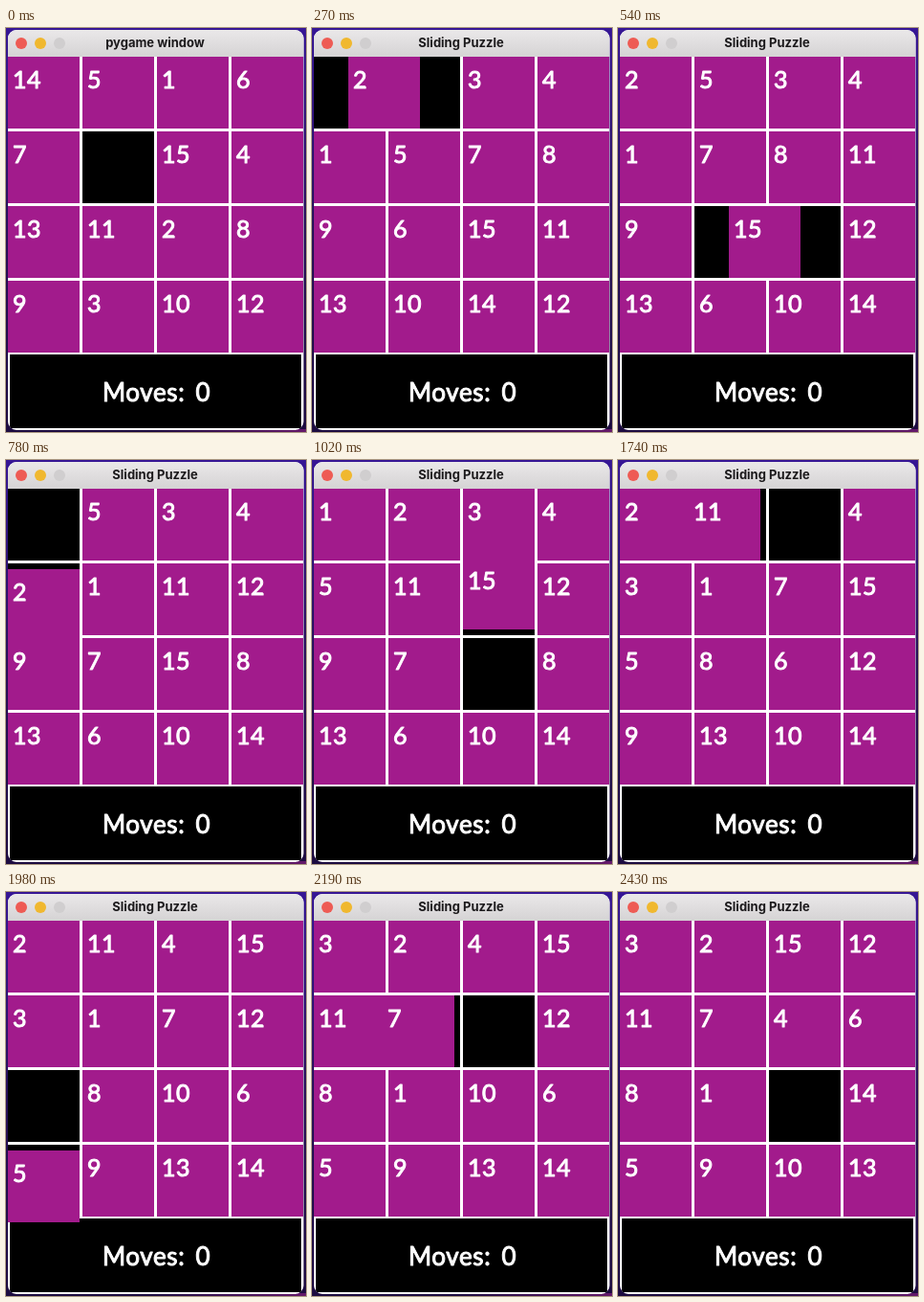
These frames come from a looping animation (314x422 px, 2730 ms). An HTML page with a canvas:

```html
<!DOCTYPE html>
<html lang="en">
<head>
<meta charset="utf-8">
<title>Sliding Puzzle</title>
<style>
  html, body { margin: 0; width: 314px; height: 422px; overflow: hidden; }
  canvas { display: block; }
</style>
</head>
<body>
<canvas id="stage" width="314" height="422"></canvas>
<script>
const ctx = document.getElementById('stage').getContext('2d');

const LOOP = 2730, STEP = 30;
const PITCH = 78, TILE = 75, LEFT = 2, TOP = 30, SLIDE = 42;
const PURPLE = '#a21b8c';

// The previous game flashes up before the solved board is shuffled.
const oldBoard = [14, 5, 1, 6, 7, 0, 15, 4, 13, 11, 2, 8, 9, 3, 10, 12];
const solved = [1, 2, 3, 4, 5, 6, 7, 8, 9, 10, 11, 12, 13, 14, 15, 0];

// Directions in which the gap travels, one move per step.
const shuffle = 'ULDLUULURDRRDDLLUR' + 'URDLLULURDLURDRD' + 'RULLURDDLDLUUU' +
                'RDRDLULURR' + 'RDDLDLLURUULDRR' + 'URDDDLU';
const offsets = { U: -4, D: 4, L: -1, R: 1 };

// The last moved tile went from cell "from" (now the gap) to cell "to".
function boardAfter(moves) {
  const board = [...solved];
  let from = 15, to = 15;
  for (const dir of shuffle.slice(0, moves)) {
    to = from;
    from += offsets[dir];
    board[to] = board[from];
    board[from] = 0;
  }
  return { board, from, to };
}

const cellX = i => LEFT + PITCH * (i % 4);
const cellY = i => TOP + PITCH * Math.floor(i / 4);

function rect(color, x, y, w, h) {
  ctx.fillStyle = color;
  ctx.fillRect(x, y, w, h);
}

function label(text, x, y, size) {
  ctx.font = `${size}px Lato, sans-serif`;
  ctx.letterSpacing = '0.6px';
  ctx.wordSpacing = '4px';
  ctx.textAlign = 'left';
  ctx.textBaseline = 'alphabetic';
  ctx.fillStyle = ctx.strokeStyle = '#fff';
  ctx.lineWidth = 1;
  ctx.lineJoin = 'round';
  ctx.fillText(text, x, y);
  ctx.strokeText(text, x, y);
}

function tile(value, x, y) {
  rect(value ? PURPLE : '#000', x, y, TILE, TILE);
  if (value) label(value, x + 5, y + 33, 25);
}

function gradient(x0, y0, x1, y1, ...colors) {
  const fill = ctx.createLinearGradient(x0, y0, x1, y1);
  colors.forEach((c, i) => fill.addColorStop(i / (colors.length - 1), c));
  return fill;
}

function drawWindow(title) {
  rect(gradient(0, 0, 0, 422, '#361695', '#260f58', '#1c0b40'), 0, 0, 314, 422);
  rect(gradient(150, 0, 314, 0, '#1c0b40', '#64186a'), 150, 419, 164, 3);

  ctx.beginPath();
  ctx.roundRect(2, 2, 309.5, 418, 9);
  ctx.clip();
  rect('#fff', 0, 0, 314, 422);
  rect(gradient(0, 2, 0, 30, '#eae8e9', '#d5d3d4'), 0, 0, 314, 30);

  ['#ee5b54', '#f0b82f', '#d0cecf'].forEach((color, i) => {
    ctx.fillStyle = color;
    ctx.beginPath();
    ctx.arc(16 + 20 * i, 16, 6, 0, 2 * Math.PI);
    ctx.fill();
  });

  ctx.font = 'bold 13px Inter, sans-serif';
  ctx.textAlign = 'center';
  ctx.textBaseline = 'middle';
  ctx.fillStyle = '#1c1a1c';
  ctx.fillText(title, 156, 16);

  rect('#000', 4, 341, 305, 77);
  label('Moves: 0', 101, 390, 26);
}

function draw(time) {
  const step = Math.floor((time % LOOP) / STEP);
  const moving = step > 0 && step <= shuffle.length;
  const { board, from, to } = boardAfter(step);
  const cells = step ? board : oldBoard;

  ctx.save();
  drawWindow(step ? 'Sliding Puzzle' : 'pygame window');
  cells.forEach((value, i) => tile(moving && i === to ? 0 : value, cellX(i), cellY(i)));

  if (moving) {
    // In later moves the tile is seen overshooting its place.
    const travel = (step < 26 ? SLIDE : 2 * SLIDE) / PITCH;
    const x = cellX(from) + (cellX(to) - cellX(from)) * travel;
    const y = cellY(from) + (cellY(to) - cellY(from)) * travel;
    tile(board[to], x, y);
  }
  ctx.restore();
}

const start = performance.now();
function frame() {
  draw(performance.now() - start);
  requestAnimationFrame(frame);
}
frame();
</script>
</body>
</html>
```
